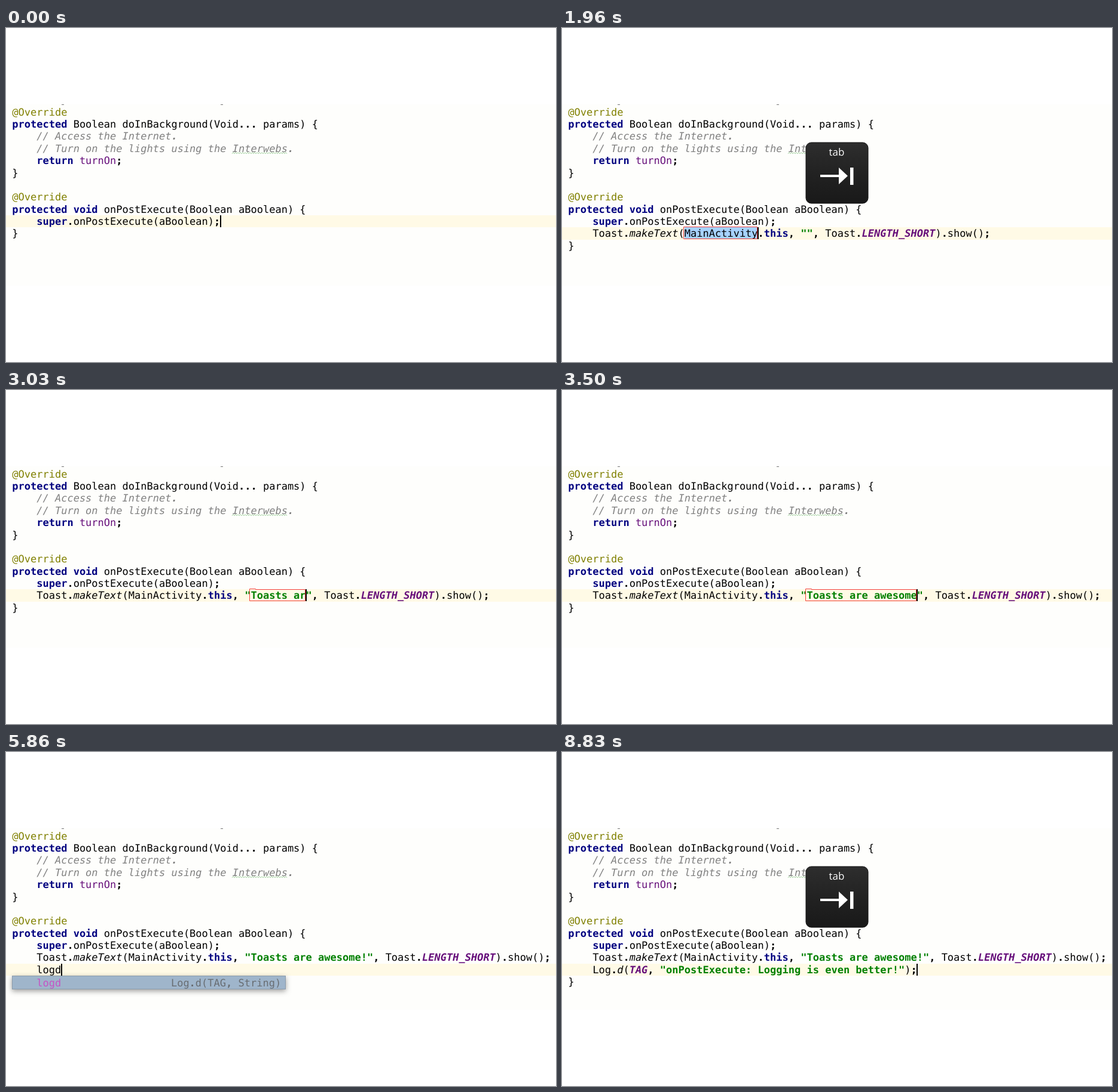
These frames come from a looping animation (920x560 px, 9100 ms). An HTML page with a canvas:

```html
<!DOCTYPE html>
<html lang="en">
<head>
<meta charset="utf-8">
<title>Live templates</title>
<style>
  html, body { margin: 0; width: 100%; height: 100%; overflow: hidden; background: #fff; }
  canvas { display: block; }
</style>
</head>
<body>
<canvas id="stage" width="920" height="560"></canvas>
<script>
const ctx = document.getElementById('stage').getContext('2d');
const LOOP = 9100;
const LEFT = 10.3, CELL = 10.235, TOP = 130.7, PITCH = 20.36;
const MONO = '17px "DejaVu Sans Mono", monospace';

const STYLES = {
  plain: ['', '#000'],
  keyword: ['bold ', '#000080'],
  note: ['', '#808000'],
  comment: ['italic ', '#808080'],
  field: ['', '#660e7a'],
  constant: ['italic bold ', '#660e7a'],
  method: ['italic ', '#000'],
  string: ['bold ', '#008000'],
};

const colX = col => LEFT + col * CELL;
const rowY = row => Math.round(TOP + row * PITCH);
const between = (t, a, b) => t >= a && t < b;

function rect(x, y, w, h, color) {
  ctx.fillStyle = color;
  ctx.fillRect(x, y, w, h);
}

function path(points, close) {
  ctx.beginPath();
  points.forEach(([x, y]) => ctx.lineTo(x, y));
  if (close) ctx.closePath();
}

// One glyph per cell; punctuation is heavier than the letters.
function glyphs(text, x, y, font, color) {
  ctx.fillStyle = color;
  [...text].forEach((ch, i) => {
    const weight = /[.,;]/.test(ch) && !font.includes('bold') ? 'bold ' : '';
    ctx.font = font + weight + MONO;
    ctx.fillText(ch, x + i * CELL, y);
  });
}

// Parts alternate style name and text.
function line(row, indent, ...parts) {
  let col = indent;
  for (let i = 0; i < parts.length; i += 2) {
    const [font, color] = STYLES[parts[i]];
    glyphs(parts[i + 1], colX(col), TOP + row * PITCH + 16, font, color);
    col += parts[i + 1].length;
  }
}

function typed(text, t, from, to) {
  if (t < from) return '';
  const count = 1 + Math.floor((t - from) / (to - from) * (text.length - 1) + 1e-6);
  return text.slice(0, count);
}

function caret(row, col) {
  rect(Math.floor(colX(col)), rowY(row), 2, 20, '#000');
}

function fieldBox(row, col, length, settled) {
  const x = Math.round(colX(col)) - 1.5, right = Math.round(colX(col + length)) - 1.5;
  const y = rowY(row) + .5, step = Math.min(x + 10, right);
  ctx.strokeStyle = '#f4413c';
  ctx.lineWidth = 1;
  path(settled ? [[x, y - 1], [right, y - 1], [right, y + 19], [x, y + 19]]
    : [[x, y - 1], [step, y - 1], [step, y], [right, y], [right, y + 19], [x, y + 19]], true);
  ctx.stroke();
}

function popup(y, width, rows, selected) {
  const height = rows * 23 + (rows > 1 ? 1 : 0);
  ctx.save();
  ctx.shadowColor = 'rgba(0,0,0,.38)';
  ctx.shadowBlur = 9;
  ctx.shadowOffsetY = 3;
  rect(10, y, width, height, '#ebf4fe');
  ctx.restore();
  rect(10, y + selected * 23, width, 23 + (selected ? 1 : 0), '#9fb5cb');
  ctx.strokeStyle = 'rgba(120,130,140,.5)';
  ctx.lineWidth = 1;
  ctx.strokeRect(10.5, y + .5, width - 1, height - 1);
}

function classIcons(y) {
  ctx.beginPath();
  ctx.arc(22, y, 7, 0, 7);
  ctx.fillStyle = '#c3d7e3';
  ctx.fill();
  ctx.strokeStyle = '#8ba3b2';
  ctx.lineWidth = 1;
  ctx.stroke();
  ctx.beginPath();
  ctx.arc(22, y, 3, .8, 5.5);
  ctx.strokeStyle = '#46606f';
  ctx.lineWidth = 1.4;
  ctx.stroke();
  rect(37, y, 8, 6, '#7fc580');
  rect(40, y + 2, 2, 2, '#e8f7e6');
  ctx.beginPath();
  ctx.arc(37, y - 1, 2.3, Math.PI, 0);
  ctx.strokeStyle = '#7fc580';
  ctx.stroke();
}

function bulb(y) {
  rect(306, y - 10, 18, 20, '#9fb5cb');
  ctx.beginPath();
  ctx.arc(313.5, y - 2, 6.3, 0, 7);
  ctx.fillStyle = '#f5b944';
  ctx.fill();
  ctx.beginPath();
  ctx.arc(313, y - 3, 3, 0, 7);
  ctx.fillStyle = '#ffe4a0';
  ctx.fill();
  rect(311, y + 4, 5, 5, '#6b6660');
}

function toastPopup(t) {
  const selected = t < 1100 ? 0 : 1;
  popup(354, 315, 2, selected);
  classIcons(366);
  glyphs('Toast', colX(4), 372, '', '#c653c4');
  glyphs('(android.widget)', colX(10), 372, '', selected ? '#b9bdc2' : '#707478');
  glyphs('Toast', colX(4), 394.5, '', '#c653c4');
  glyphs('Create a new Toast', colX(12), 394.5, '', selected ? '#686d72' : '#b9bdc2');
  if (t >= 730) bulb(selected ? 389 : 366);
}

function logPopup() {
  popup(375, 458, 1, 0);
  glyphs('logd', colX(4), 392.5, '', '#c653c4');
  glyphs('Log.d(TAG, String)', colX(26) - .5, 392.5, '', '#686d72');
}

function tabKey() {
  const shade = ctx.createLinearGradient(0, 192, 0, 294);
  shade.addColorStop(0, '#2e2e2e');
  shade.addColorStop(.5, '#222');
  shade.addColorStop(1, '#191919');
  ctx.beginPath();
  ctx.roundRect(408, 192, 104, 102, 9);
  ctx.fillStyle = shade;
  ctx.fill();
  ctx.strokeStyle = '#111';
  ctx.lineWidth = 1;
  ctx.stroke();
  ctx.font = '17px "Open Sans", "Noto Sans", sans-serif';
  ctx.textAlign = 'center';
  ctx.fillStyle = '#fff';
  ctx.fillText('tab', 459.5, 214);
  ctx.textAlign = 'left';
  rect(432, 246, 34, 4, '#fff');
  path([[463, 234], [478, 248], [463, 262]], true);
  ctx.fill();
  rect(482, 234, 5.5, 29, '#fff');
}

function staticCode() {
  rect(93, 128, 4, 1, '#777');
  rect(359, 128, 4, 1, '#777');
  line(0, 0, 'note', '@Override');
  line(1, 0, 'keyword', 'protected', 'plain', ' Boolean doInBackground(Void... params) {');
  line(2, 4, 'comment', '// Access the Internet.');
  line(3, 4, 'comment', '// Turn on the lights using the Interwebs.');
  line(4, 4, 'keyword', 'return', 'field', ' turnOn', 'plain', ';');
  line(5, 0, 'plain', '}');
  line(7, 0, 'note', '@Override');
  line(8, 0, 'keyword', 'protected void', 'plain', ' onPostExecute(Boolean aBoolean) {');
  line(9, 4, 'keyword', 'super', 'plain', '.onPostExecute(aBoolean);');

  const wave = Array.from({ length: 47 }, (_, i) => [378 + i * 2, i % 2 ? 208.5 : 211]);
  ctx.strokeStyle = '#a9d5a6';
  ctx.lineWidth = 1;
  path(wave);
  ctx.stroke();
}

function toastLine(t) {
  if (t < 1300) {
    const word = typed('Toast', t, 150, 500);
    line(10, 4, 'plain', word);
    if (!between(t, 930, 1100)) caret(10, 4 + word.length);
    return;
  }
  const first = t >= 2400 ? 'T' : '';
  const last = t >= 3600 ? '!' : '';
  const message = first + typed('oasts are awesome', t, 2630, 3500) + last;
  const resolved = t >= 1600;
  if (t < 2000) rect(colX(19), rowY(10), 12 * CELL, 20, '#a6d2ff');
  line(10, 4, 'plain', 'Toast.', resolved ? 'method' : 'plain', 'makeText',
    'plain', '(MainActivity.', 'keyword', 'this', 'plain', ', ',
    'string', `"${message}"`, 'plain', ', Toast.',
    resolved ? 'constant' : 'plain', 'LENGTH_SHORT', 'plain', ').show();');
  if (t < 2000) {
    fieldBox(10, 19, 12, true);
    caret(10, 31);
  } else if (t < 4460) {
    fieldBox(10, 39, message.length, t >= 3800);
    if (t < 4200) caret(10, 39 + message.length);
  } else if (t < 4960) {
    caret(10, 88);
  }
}

function logLine(t) {
  if (t < 6260) {
    const word = typed('log', t, 5430, 5560) + (t >= 5760 ? 'd' : '');
    line(11, 4, 'plain', word);
    caret(11, 4 + word.length);
    return;
  }
  const message = typed('Logging i', t, 6830, 7360) + typed('s even', t, 7400, 7730)
    + typed(' better', t, 7800, 8260) + (t >= 8400 ? '!' : '');
  const resolved = t >= 6500;
  line(11, 4, 'plain', 'Log.', resolved ? 'method' : 'plain', 'd', 'plain', '(',
    resolved ? 'constant' : 'plain', 'TAG', 'plain', ', ',
    'string', `"onPostExecute: ${message}"`, 'plain', ');');
  if (t < 8830) {
    fieldBox(11, 31, message.length, t >= 8600);
    caret(11, 31 + message.length);
  } else {
    caret(11, 57);
  }
}

function draw(t) {
  const active = t < 60 ? 9 : t < 5160 ? 10 : 11;
  rect(0, 0, 920, 560, '#fff');
  rect(0, 128, 920, 304, '#fefefc');
  rect(0, rowY(active), 920, rowY(active + 1) - rowY(active), '#fffae6');
  staticCode();
  line(active + 1, 0, 'plain', '}');

  if (active === 9) caret(9, 34);
  if (active >= 10) toastLine(t);
  if (active === 11) logLine(t);

  if (between(t, 700, 1300)) toastPopup(t);
  if (between(t, 5800, 6230)) logPopup();

  const keyPresses = [[1230, 1500], [1960, 2230], [4430, 4730], [6200, 6500], [8800, LOOP]];
  if (keyPresses.some(([on, off]) => between(t, on, off))) tabKey();
}

ctx.textRendering = 'geometricPrecision';
const start = performance.now();
function tick() {
  draw((performance.now() - start) % LOOP);
  requestAnimationFrame(tick);
}
tick();
</script>
</body>
</html>
```
